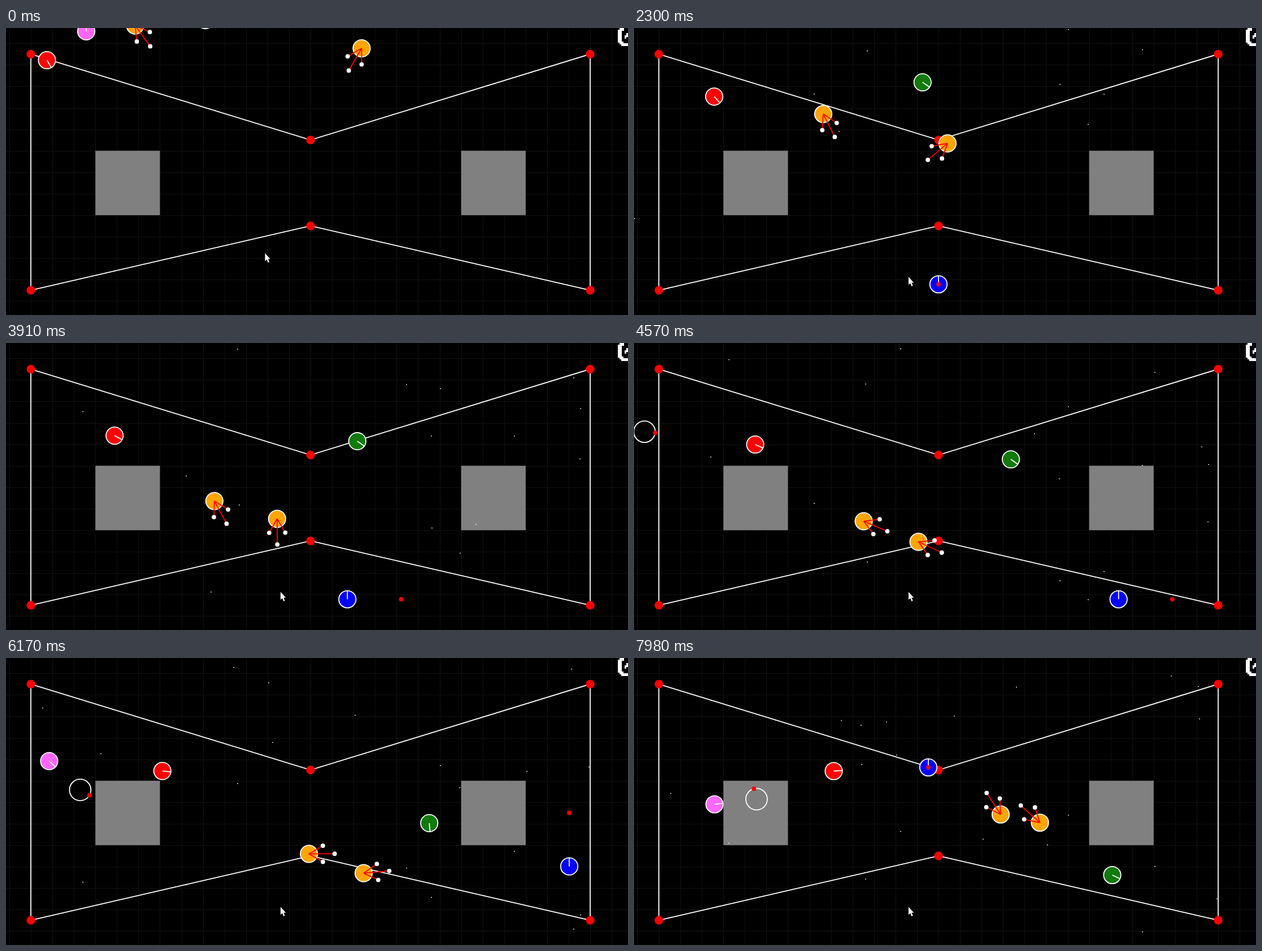
An HTML page with a canvas that plays this animation: 1101x509 px, repeating every 8000 ms.

```html
<!DOCTYPE html>
<html lang="en">
<head>
<meta charset="utf-8">
<title>Steering agents</title>
<style>
  html, body { margin: 0; height: 100%; overflow: hidden; background: #000; }
  canvas { display: block; }
</style>
</head>
<body>
<canvas id="stage" width="1101" height="509"></canvas>
<script>
const ctx = document.getElementById('stage').getContext('2d');
const W = 1101, H = 509, LOOP = 8000, CELL = 38.08, RAD = Math.PI / 180;
const cell = (cx, cy) => [44 + cx * CELL, 46.3 + cy * CELL];

// Turning points: [time, x, y, heading in degrees]
const red = [[0, 72.5, 57, 41], [4570, 214.5, 180, 33], [7980, 353.5, 200.5, -3]];
const green = [[0, 352.5, -14, 35], [5530, 732, 253, 36], [6850, 768.5, 332.5, 29], [7980, 846.5, 385, 25]];
const orange = [
  [[0, 228.5, -4.5, 54], [1310, 285.5, 87, 43], [3240, 355, 227, 87.5], [4570, 406.5, 316, 23],
   [6850, 591, 338.5, -19], [7980, 649, 277.5, -123]],
  [[0, 629.5, 36, 120], [1310, 608, 142.5, 113], [3240, 497.5, 259.5, 126], [4570, 503.5, 352.5, 25],
   [6850, 685.5, 366, -29], [7980, 718.5, 292, -138]]
];
// Leaves at the top, returns from the left, stops at the box: [time, x, y, heading, wander angle]
const pink = [[0, 142, 6, -90, -15], [1000, 142, -77, -90, -15], [3600, -83, 42, -275, -15],
  [5530, 39.5, 145, -329, 27], [6850, 115.5, 223, -304.5, 33], [7400, 142.5, 259.5, -304.5, -30],
  [7980, 142.5, 259.5, -367, -104]];
const pointer = [[100, 458.5, 399.6], [700, 486, 441.6]];

// The blue player moves in straight legs at one speed: [start time, dx, dy]
const PLAYER_SPEED = 0.384;
const legs = [[357, 0, -360], [1750, 0, 190.5], [2400, -177, 0], [3280, 635, 0], [5950, 0, -260.5], [6735, -476, 0]];

let seed = 7;
const random = () => (seed = seed * 16807 % 2147483647) / 2147483647;
const specks = Array.from({ length: 34 }, (_, i) =>
  ({ x: Math.floor(random() * W), start: 500 + i * 220, speed: 0.04 + random() * 0.16 }));

function segment(keys, t) {
  let i = 0;
  while (i < keys.length - 2 && t >= keys[i + 1][0]) i++;
  const a = keys[i], b = keys[i + 1], span = b[0] - a[0];
  return { a, b, span, u: Math.max(0, Math.min(1, (t - a[0]) / span)) };
}

function linear(keys, t) {
  const { a, b, u } = segment(keys, t);
  return a.slice(1).map((v, i) => v + (b[i + 1] - v) * u);
}

// Hermite path that leaves and reaches each turning point along its heading
function steer(keys, t, speed) {
  const { a, b, span, u } = segment(keys, t);
  const axis = (i, trig) => {
    const p = a[i], q = b[i], m = trig(a[3] * RAD) * speed * span, n = trig(b[3] * RAD) * speed * span;
    const c2 = 3 * (q - p) - 2 * m - n, c3 = 2 * (p - q) + m + n;
    return [p + u * (m + u * (c2 + u * c3)), m + u * (2 * c2 + 3 * u * c3)];
  };
  const [x, dx] = axis(1, Math.cos), [y, dy] = axis(2, Math.sin);
  return [x, y, Math.atan2(dy, dx)];
}

function playerAt(t) {
  const player = { x: 539, y: 624, vx: 0, vy: 0 };
  for (const [start, dx, dy] of legs) {
    const u = (t - start) * PLAYER_SPEED / Math.hypot(dx, dy);
    const done = Math.max(0, Math.min(1, u));
    player.x += dx * done;
    player.y += dy * done;
    if (u > 0 && u < 1) {
      player.vx = Math.sign(dx) * PLAYER_SPEED;
      player.vy = Math.sign(dy) * PLAYER_SPEED;
    }
  }
  return player;
}

const ahead = (x, y, angle, dist) => [x + Math.cos(angle) * dist, y + Math.sin(angle) * dist];

function line(points, color = '#fff', closed = false) {
  ctx.beginPath();
  points.forEach(p => ctx.lineTo(...p));
  if (closed) ctx.closePath();
  ctx.strokeStyle = color;
  ctx.lineWidth = 1.8;
  ctx.stroke();
}

function disc(x, y, r, fill, outlined) {
  ctx.beginPath();
  ctx.arc(x, y, r, 0, 2 * Math.PI);
  if (fill) { ctx.fillStyle = fill; ctx.fill(); }
  if (outlined) { ctx.strokeStyle = '#fff'; ctx.lineWidth = 1.8; ctx.stroke(); }
}

function agent([x, y, angle], color) {
  disc(x, y, 15.2, color, true);
  line([[x, y], ahead(x, y, angle, 15)]);
}

function whiskerAgent([x, y, angle]) {
  disc(x, y, 15.2, '#ffa500', true);
  const tips = [-30, 0, 30].map(turn => ahead(x, y, angle + turn * RAD, turn ? 28.5 : 45.5));
  tips.forEach(tip => line([[x, y], tip], '#f00'));
  tips.forEach(tip => disc(...tip, 3.9, '#fff'));
}

function drawArena() {
  ctx.fillStyle = '#000';
  ctx.fillRect(0, 0, W, H);
  ctx.fillStyle = '#121212';
  const [left, top] = cell(-1, -0.5);
  for (let x = left; x < W; x += CELL) ctx.fillRect(Math.round(x), 0, 1, H);
  for (let y = top; y < H; y += CELL) ctx.fillRect(0, Math.round(y), W, 1);
  ctx.fillStyle = '#808080';
  for (const column of [3, 20]) ctx.fillRect(...cell(column, 4.5), 3 * CELL, 3 * CELL);
  const corners = [[0, 0], [13, 4], [26, 0], [26, 11], [13, 8], [0, 11]].map(c => cell(...c));
  line(corners, '#fff', true);
  corners.forEach(c => disc(...c, 7.6, '#f00'));
}

// Left part of a pixel digit cut off by the stage edge
function drawDigit() {
  ctx.fillStyle = '#fff';
  for (const [x, y, w, h] of [[1083, 3, 7, 23], [1086, 0, 8, 5], [1086, 24, 7, 5], [1089, 27, 12, 5],
    [1095, 13, 3, 6], [1098, 9, 3, 7]]) ctx.fillRect(x, y, w, h);
}

function drawPointer([x, y]) {
  ctx.beginPath();
  for (const [dx, dy] of [[0, 0], [0, 14], [3, 11], [5.3, 16.3], [7.6, 15.3], [5.4, 10.2], [9.3, 10.2]])
    ctx.lineTo(x + dx, y + dy);
  ctx.fillStyle = '#fff';
  ctx.fill();
}

function draw(t) {
  drawArena();
  ctx.fillStyle = '#fff';
  for (const { x, start, speed } of specks)
    if (t >= start) ctx.fillRect(x, (t - start) * speed, 2, 1.2);

  const [rx, ry, course] = steer(red, t, 0.0415);
  const wobble = 19 * RAD * Math.cos(t / 2900 * 2 * Math.PI) * Math.max(0, 1 - (t / 5530) ** 4);
  agent([rx, ry, course + wobble], '#f00');
  agent(steer(green, t, 0.083), '#117a0a');
  orange.forEach(keys => whiskerAgent(steer(keys, t, 0.083)));

  const [px, py, heading, wander] = linear(pink, t);
  agent([px, py, heading * RAD], '#ff66ff');
  const ring = ahead(px, py, heading * RAD, 75);
  disc(...ring, 19, null, true);
  disc(...ahead(...ring, wander * RAD, 19), 3.9, '#f00');

  const { x, y, vx, vy } = playerAt(t);
  agent([x, y, -Math.PI / 2], '#00f');
  disc(x + vx * 248, y + vy * 248, 3.9, '#f00');

  drawDigit();
  drawPointer(linear(pointer, t));
}

const began = performance.now();
function frame() {
  draw((performance.now() - began) % LOOP);
  requestAnimationFrame(frame);
}
frame();
</script>
</body>
</html>
```
